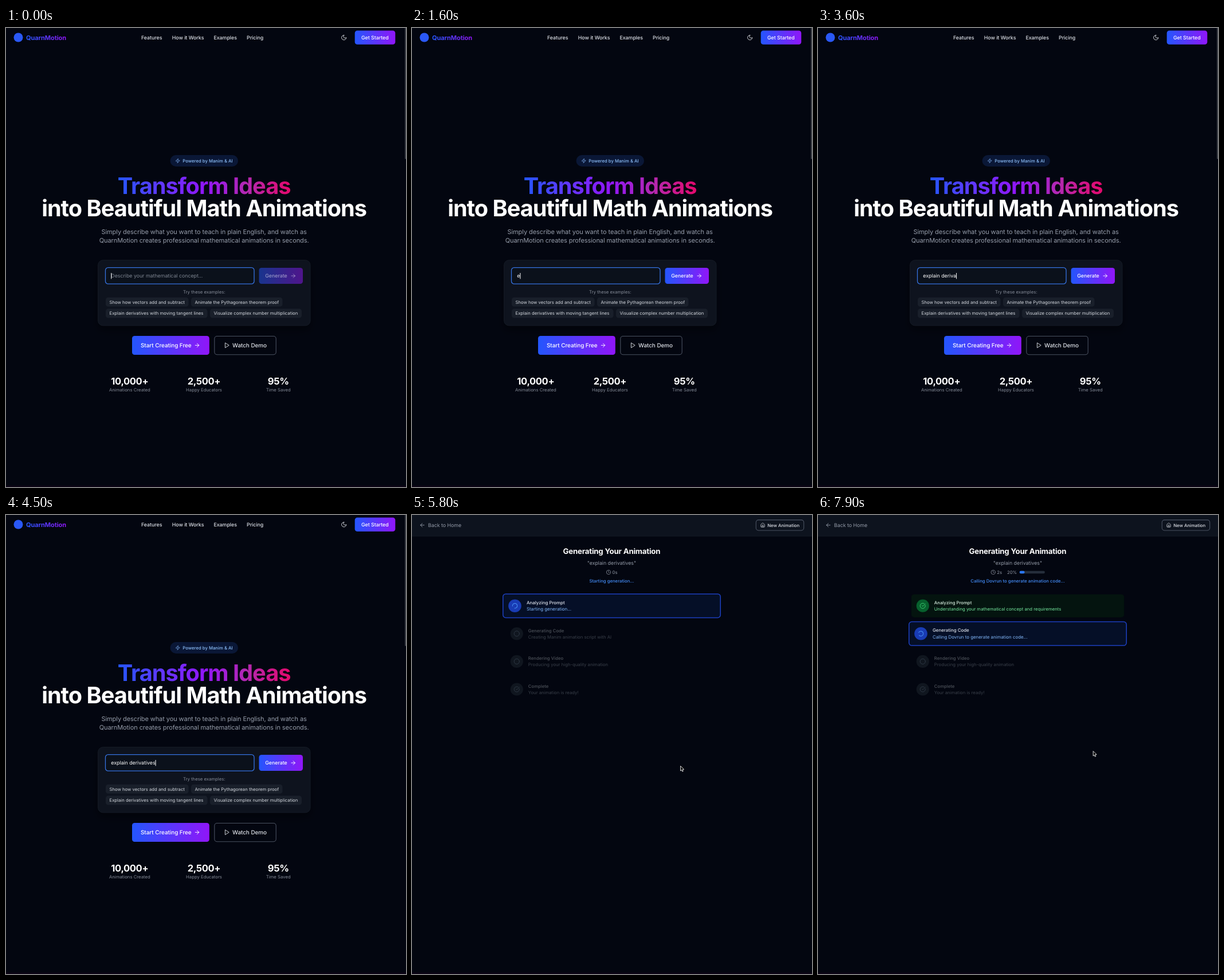
An HTML page with a canvas for the animation above (8000 ms loop, 698 px wide and 802 px high).

```html
<!DOCTYPE html>
<html lang="en">
<head>
<meta charset="utf-8">
<title>Prompt to animation</title>
<style>
html, body { margin: 0; width: 100%; height: 100%; overflow: hidden; background: #030610; }
canvas { display: block; width: 698px; height: 802px; }
</style>
</head>
<body>
<canvas id="stage"></canvas>
<script>
const W = 698, H = 802, LOOP = 8000;
const S = 0.552; // page zoom: CSS pixels to stage pixels
const FAMILY = 'Inter, "Liberation Sans", sans-serif';
const canvas = document.getElementById('stage');
const dpr = window.devicePixelRatio || 1;
canvas.width = W * dpr;
canvas.height = H * dpr;
const ctx = canvas.getContext('2d');

const BG = '#030610', BLUE = '#2456fd', PURPLE = '#9016f8', PINK = '#e4086c';
const HERO = [BLUE, '#5f38fb', PURPLE, '#b428b0', PINK];
const MUTED = '#959ca9', SOFT = '#858b97', LIGHT = '#dfe2e8';
const PROMPT = 'explain derivatives';
const BRAND = 'QuarnMotion';
const CALLING = 'Calling Dovrun to generate animation code...';
const STARTING = 'Starting generation...';

const T = { type: 1480, key: 160, move: 4750, click: 5250, page: 5600, next: 7000 };

const ICONS = {
  moon: 'M12 3a6 6 0 0 0 9 9 9 9 0 1 1-9-9Z',
  zap: 'M4 14a1 1 0 0 1-.78-1.63l9.9-10.2a.5.5 0 0 1 .86.46l-1.92 6.02A1 1 0 0 0 13 10h7a1 1 0 0 1 .78 1.63l-9.9 10.2a.5.5 0 0 1-.86-.46l1.92-6.02A1 1 0 0 0 11 14z',
  right: 'M5 12h14M12 5l7 7-7 7',
  left: 'M19 12H5M12 19l-7-7 7-7',
  play: 'M6 3l14 9-14 9z',
  home: 'M15 21v-8a1 1 0 0 0-1-1h-4a1 1 0 0 0-1 1v8M3 10a2 2 0 0 1 .71-1.53l7-6a2 2 0 0 1 2.58 0l7 6A2 2 0 0 1 21 10v9a2 2 0 0 1-2 2H5a2 2 0 0 1-2-2z',
  clock: 'M22 12a10 10 0 1 1-20 0a10 10 0 1 1 20 0M12 6v6l4 2',
  circle: 'M22 12a10 10 0 1 1-20 0a10 10 0 1 1 20 0',
  check: 'M21.8 10A10 10 0 1 1 17 3.34M9 11l3 3L22 4',
  spin: 'M21 12a9 9 0 1 1-6.22-8.56'
};
for (const k in ICONS) ICONS[k] = new Path2D(ICONS[k]);

const clamp = v => Math.max(0, Math.min(1, v));
const ease = v => { v = clamp(v); return v * v * (3 - 2 * v); };
const mix = (a, b, k) => a + (b - a) * k;

function setFont(size, weight, tracking) {
  ctx.font = `${weight} ${size}px ${FAMILY}`;
  ctx.letterSpacing = tracking + 'px';
  ctx.textRendering = 'geometricPrecision';
}

// Large Inter is tighter; track it by hand if the font has no optical sizes.
function emWidth(size) {
  setFont(size, 700, 0);
  return ctx.measureText('Beautiful Animations').width / size;
}
const hasOptical = emWidth(32) < emWidth(14) * 0.98;
const spacing = hasOptical ? 0.009 : -0.026;
const tracking = size => spacing * size * clamp((size - 14) / 18);

function textWidth(str, size, weight = 400) {
  setFont(size, weight, tracking(size));
  return ctx.measureText(str).width * S;
}

// y is the middle of the line; a colour list becomes a left-to-right gradient
function text(str, x, y, size, color, weight = 400, align = 'left') {
  ctx.save();
  ctx.translate(x, y);
  ctx.scale(S, S);
  setFont(size, weight, tracking(size));
  const w = ctx.measureText(str).width;
  if (align === 'center') ctx.translate(-w / 2, 0);
  ctx.fillStyle = Array.isArray(color) ? gradient(0, w, color) : color;
  ctx.fillText(str, 0, size * 0.3636);
  ctx.restore();
}

function gradient(x0, x1, colors) {
  const g = ctx.createLinearGradient(x0, 0, x1, 0);
  colors.forEach((c, i) => g.addColorStop(i / (colors.length - 1), c));
  return g;
}

function box(x, y, w, h, r, fill, stroke, line = 0.6) {
  ctx.beginPath();
  ctx.roundRect(x, y, w, h, r);
  if (fill) { ctx.fillStyle = fill; ctx.fill(); }
  if (stroke) { ctx.strokeStyle = stroke; ctx.lineWidth = line; ctx.stroke(); }
}

function disc(x, y, r, fill) {
  ctx.beginPath();
  ctx.arc(x, y, r, 0, Math.PI * 2);
  ctx.fillStyle = fill;
  ctx.fill();
}

function icon(name, x, y, size, color, angle = 0) {
  ctx.save();
  ctx.translate(x, y);
  ctx.rotate(angle);
  ctx.scale(size * S / 24, size * S / 24);
  ctx.translate(-12, -12);
  ctx.lineWidth = 2;
  ctx.lineCap = ctx.lineJoin = 'round';
  ctx.strokeStyle = color;
  ctx.stroke(ICONS[name]);
  ctx.restore();
}

function faded(alpha, draw) {
  ctx.save();
  ctx.globalAlpha *= alpha;
  draw();
  ctx.restore();
}

const gradBox = (x, y, w, h) => box(x, y, w, h, 4.4, gradient(x, x + w, [BLUE, PURPLE]));

function navBar() {
  disc(21.5, 16.5, 8, '#2a58f5');
  text(BRAND, 35, 16.5, 20, [BLUE, PURPLE], 700);
  text('Features', 236, 16.7, 16, LIGHT, 500);
  text('How it Works', 289.8, 16.7, 16, LIGHT, 500);
  text('Examples', 362.4, 16.7, 16, LIGHT, 500);
  text('Pricing', 420, 16.7, 16, LIGHT, 500);
  icon('moon', 589.7, 16.7, 20, LIGHT);
  gradBox(608.7, 4.5, 70.6, 24.3);
  text('Get Started', 643.8, 16.6, 16, '#fff', 500, 'center');
}

function hero() {
  box(286.5, 222, 118.5, 20, 10, '#0a1736');
  icon('zap', 299.7, 232, 16, '#86b8fb');
  text('Powered by Manim & AI', 308.3, 232, 14, '#8ec0fb', 500);
  text('Transform Ideas', 345.6, 275.2, 72, HERO, 700, 'center');
  text('into Beautiful Math Animations', 345.6, 315, 72, '#fff', 700, 'center');
  text('Simply describe what you want to teach in plain English, and watch as',
    345.6, 355.7, 20, MUTED, 400, 'center');
  text(BRAND + ' creates professional mathematical animations in seconds.',
    345.6, 371.2, 20, MUTED, 400, 'center');
}

function chip(str, x, y, w) {
  box(x, y - 8, w, 16, 4.4, '#191f2a');
  text(str, x + 6.5, y, 14, '#d3d7de');
}

function promptCard(t) {
  const count = t < T.type ? 0 : Math.min(PROMPT.length, 1 + Math.floor((t - T.type) / T.key));
  const typed = PROMPT.slice(0, count);
  const busy = t >= T.click;

  ctx.save();
  ctx.shadowColor = 'rgba(0, 0, 0, 0.4)';
  ctx.shadowBlur = 14 * dpr;
  ctx.shadowOffsetY = 8 * dpr;
  box(160.5, 405.6, 370.6, 114.4, 8.8, '#0e131e');
  ctx.restore();
  box(160.5, 405.6, 370.6, 114.4, 8.8, null, '#1d2430');

  if (busy) box(174.2, 419.2, 243, 27.7, 4.4, '#0c121c', '#2b3240', 0.7);
  else box(173.5, 418.6, 259.5, 28.6, 4.8, '#0b111b', '#3672e0', 1.3);

  if (count) text(typed, 183.3, 433.1, 16, '#fff');
  else text('Describe your mathematical concept...', 183.3, 433.1, 16, '#7e8591');

  const lastKey = T.type + (count - 1) * T.key;
  const since = count ? t - lastKey : t;
  if (!busy && since % 1000 < 500) {
    ctx.fillStyle = '#fff';
    ctx.fillRect(183.3 + textWidth(typed, 16), 428, 1, 10.4);
  }

  faded(busy || !count ? 0.5 : 1, () => {
    if (busy) {
      gradBox(426, 419, 92, 28);
      disc(442, 433, 4.6, '#fff');
      text('Generating...', 452.2, 433.1, 16, '#fff', 500);
    } else {
      gradBox(441.5, 419, 76.5, 28);
      text('Generate', 452.2, 433.1, 16, '#fff', 500);
      icon('right', 501.2, 433.1, 20, '#fff');
    }
  });

  text('Try these examples:', 345.7, 461.2, 14, SOFT, 400, 'center');
  faded(busy ? 0.5 : 1, () => {
    chip('Show how vectors add and subtract', 174, 478.8, 144.6);
    chip('Animate the Pythagorean theorem proof', 323, 478.8, 159.5);
    chip('Explain derivatives with moving tangent lines', 174, 498.6, 177.5);
    chip('Visualize complex number multiplication', 356, 498.6, 160);
  });
}

function footer() {
  gradBox(220, 538, 134.8, 33.1);
  text('Start Creating Free', 235, 554.4, 18, '#fff', 500);
  icon('right', 333.5, 554.4, 20, '#fff');
  box(363.8, 538.5, 107.4, 32.2, 4.4, null, '#4a5160', 1.1);
  icon('play', 385.5, 554.4, 20, LIGHT);
  text('Watch Demo', 395, 554.4, 18, LIGHT, 500);
  [['10,000+', 'Animations Created'], ['2,500+', 'Happy Educators'], ['95%', 'Time Saved']]
    .forEach(([value, label], i) => {
      const x = 215.8 + i * 129.7;
      text(value, x, 616.5, 30, '#fff', 700, 'center');
      text(label, x, 631.9, 14, SOFT, 400, 'center');
    });
}

function homePage(t) {
  navBar();
  hero();
  promptCard(t);
  footer();
  box(696, -4, 4, 233, 1.5, '#3b3e46');
}

const STEPS = [
  ['Analyzing Prompt', 'Understanding your mathematical concept and requirements'],
  ['Generating Code', 'Creating Manim animation script with AI'],
  ['Rendering Video', 'Producing your high-quality animation'],
  ['Complete', 'Your animation is ready!']
];

const LOOKS = {
  wait: { disc: '#10161f', icon: '#303a47', title: '#4c5159', desc: '#393f49' },
  active: { fill: '#050f27', edge: '#1c3fbe', disc: '#193cb5', icon: '#4a97f8', title: '#dfe4ee', desc: '#80b6f8' },
  done: { fill: '#04140f', edge: '#05190f', disc: '#07602d', icon: '#3fd476', title: '#dcf3e4', desc: '#74e69d' }
};

function step(i, state, grow, desc, t) {
  const look = LOOKS[state], y = 158.7 + i * 48.6;
  ctx.save();
  ctx.translate(348.5, y);
  ctx.scale(mix(1, 1.02, grow), mix(1, 1.02, grow));
  ctx.translate(-348.5, -y);
  if (state === 'active') box(162.5, y - 20.4, 372, 40.8, 4.8, look.fill, look.edge, 1.5);
  if (state === 'done') box(163.2, y - 19.7, 370.6, 39.4, 4.4, look.fill, look.edge, 0.6);
  disc(182.8, y, 11.1, look.disc);
  const name = state === 'active' ? 'spin' : state === 'done' || i === 3 ? 'check' : 'circle';
  const angle = name === 'spin' ? (t - 5800) / 1000 * Math.PI * 2 + 2.97 : 0;
  icon(name, 182.8, y, 20, look.icon, angle);
  text(STEPS[i][0], 202.8, y - 5.6, 14, look.title, 500);
  text(desc, 202.8, y + 5.5, 14, look.desc);
  ctx.restore();
}

function progress(t, k) {
  const secs = Math.floor((t - T.page) / 1050) + 's';
  const running = t >= T.next;
  const w = textWidth(secs, 14);
  const total = running ? 94.5 : 10.8 + w;
  const x = 348.5 - total / 2;
  icon('clock', x + 4.4, 100, 16, MUTED);
  text(secs, x + 11, 100, 14, MUTED);
  if (!running) return;
  text('20%', x + 28.7, 100, 14, MUTED);
  box(351.7, 97.8, 44.2, 4.4, 2.2, '#252e3b');
  box(351.7, 97.8, 44.2 * 0.2 * Math.max(k, 0.1), 4.4, 2.2, '#2b78fa');
}

function progressPage(t) {
  const k = ease((t - T.next) / 300);
  const running = t >= T.next;
  ctx.fillStyle = '#0d131e';
  ctx.fillRect(0, 0, W, 37);
  ctx.fillStyle = '#1a212d';
  ctx.fillRect(0, 36.7, W, 0.6);
  icon('left', 18, 17.7, 20, MUTED);
  text('Back to Home', 28, 17.8, 16, MUTED);
  box(600.3, 8.6, 83.4, 18.4, 4.4, null, '#4a5261', 1.1);
  icon('home', 612, 17.7, 16, LIGHT);
  text('New Animation', 620.2, 17.8, 14, LIGHT, 500);

  text('Generating Your Animation', 348.4, 63, 24, '#fff', 700, 'center');
  text(`"${PROMPT}"`, 348.4, 83.7, 16, MUTED, 400, 'center');
  progress(t, k);
  const status = running ? CALLING : STARTING;
  text(status, 348.4, 115.4, 14, '#438bf6', 500, 'center');

  const first = running ? STEPS[0][1] : STARTING;
  const second = running ? CALLING : STEPS[1][1];
  if (k < 1) {
    faded(1 - k, () => {
      step(0, 'active', 1 - k, first, t);
      step(1, 'wait', k, second, t);
    });
  }
  if (k > 0) {
    faded(k, () => {
      step(0, 'done', 1 - k, first, t);
      step(1, 'active', k, second, t);
    });
  }
  step(2, 'wait', 0, STEPS[2][1], t);
  step(3, 'wait', 0, STEPS[3][1], t);
}

function pointer(t) {
  if (t < T.move) return;
  const reach = ease((t - T.move) / 400), leave = ease((t - 6700) / 900);
  const x = mix(mix(400, 468.6, reach), 480.2, leave);
  const y = mix(mix(446, 438.6, reach), 412.6, leave);
  ctx.save();
  ctx.translate(x, y);
  ctx.lineJoin = 'round';
  ctx.beginPath();
  [[0, 0], [0, 8.4], [1.9, 6.7], [3.1, 9.6], [4.6, 9], [3.4, 6.1], [5.9, 5.9]]
    .forEach(p => ctx.lineTo(...p));
  ctx.closePath();
  ctx.fillStyle = '#000';
  ctx.fill();
  ctx.strokeStyle = '#f2f2f2';
  ctx.lineWidth = 0.9;
  ctx.stroke();
  if (t >= T.click && t < T.page) {
    ctx.beginPath();
    ctx.arc(5.1, 12, 3.9, 0, Math.PI * 2);
    ctx.fill();
    ctx.moveTo(2.4, 9.3);
    ctx.lineTo(7.8, 14.7);
    ctx.lineWidth = 1.4;
    ctx.stroke();
  }
  ctx.restore();
}

function draw(t) {
  ctx.setTransform(dpr, 0, 0, dpr, 0, 0);
  ctx.fillStyle = BG;
  ctx.fillRect(0, 0, W, H);
  if (t < T.page) homePage(t);
  else progressPage(t);
  ctx.fillStyle = '#0c0415';
  ctx.fillRect(0, 799.5, W, 2.5);
  pointer(t);
}

const start = performance.now();
function tick() {
  draw((performance.now() - start) % LOOP);
  requestAnimationFrame(tick);
}
tick();
</script>
</body>
</html>
```
